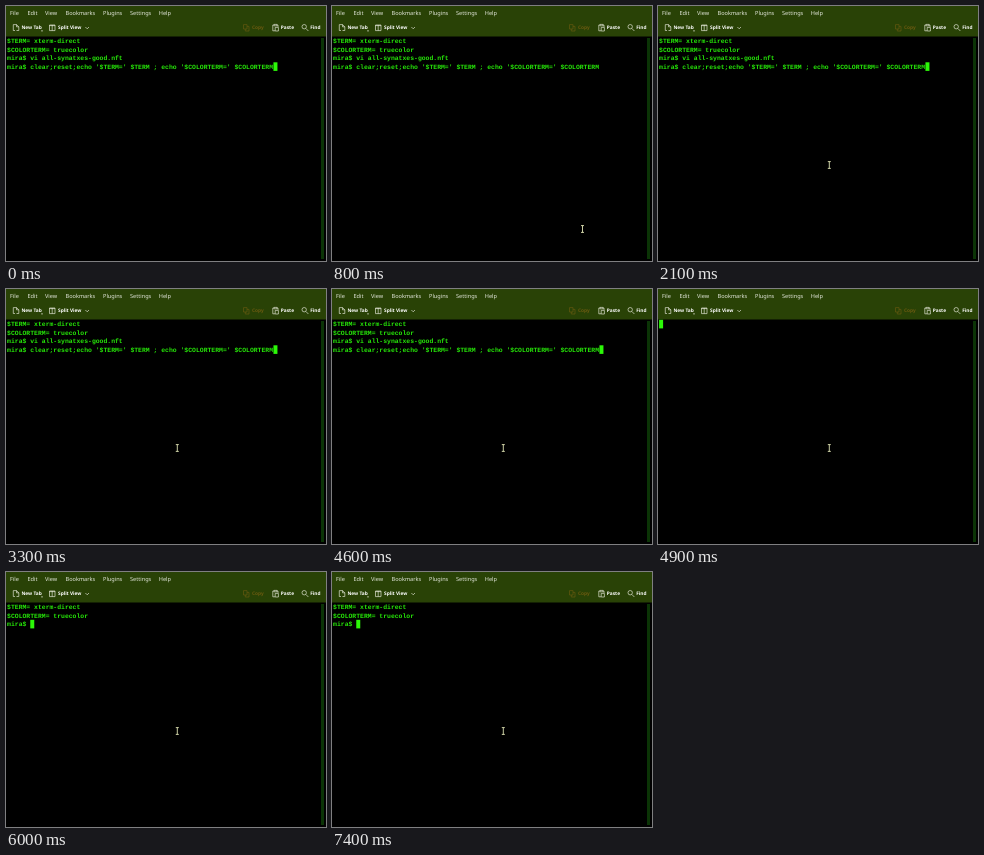
Write an HTML page that moves like this. It is 320 by 255 pixels and loops after 8000 ms.

```html
<!DOCTYPE html>
<html lang="en">
<head>
<meta charset="utf-8">
<title>Terminal</title>
<style>
  html, body { margin: 0; width: 100%; height: 100%; overflow: hidden; background: #000; }
  svg { display: block; width: 100%; height: 100%; }
  text { text-rendering: geometricPrecision; white-space: pre; }
  .menu { font: 5.6px "Noto Sans", "Open Sans", sans-serif; fill: #e4e8dc; }
  .tool { font: 600 4.8px "Noto Sans", "Open Sans", sans-serif; fill: #fff; }
  .term { font: bold 6.43px "Liberation Mono", monospace; fill: #26e808; }
  .icon { fill: none; stroke: #eceee0; stroke-width: .65; }
  .tool .dim { fill: #6a5a10; }
  .icon .dim { stroke: #6a5a10; }
</style>
</head>
<body>
<svg viewBox="0 0 320 255">
  <rect width="320" height="30.5" fill="#294206"/>
  <rect x="315" y="32" width="3" height="221" fill="#0b3406"/>
  <g id="menu" class="menu"></g>
  <g id="tools" class="tool"></g>
  <g class="icon">
    <path d="M9 24.5H7.3V18.6H10.5L12.8 20.8V24.5H10.5M10.5 18.6V20.8H12.8"/>
    <path d="M35 24.6H37L36 25.7Z" fill="#eceee0" stroke="none"/>
    <path d="M43.5 19H49V24.6H43.5ZM46.2 19V24.6M43.5 19.6H49"/>
    <path d="M79.4 21L81.2 22.8L83 21"/>
    <path class="dim" d="M237.5 18.6H241V23H237.5ZM239.3 23V25H243V20.4H241"/>
    <path d="M268 19H266.8V24.8H269M271 19H272V21M268 18.4H271V19.8H268ZM269.2 21.4H272.4V25H269.2Z"/>
    <path d="M299.9 22.5L302.4 25"/>
    <circle cx="298.2" cy="20.7" r="2.2"/>
  </g>
  <g id="lines" class="term"></g>
  <rect id="cursor" width="4" height="8.6" fill="#2cf808"/>
  <path id="pointer" d="M-1.5 -3.4H1.5M0 -3.4V3.4M-1.5 3.4H1.5" fill="none" stroke="#e0e4b4" stroke-width=".9"/>
</svg>
<script>
  const $ = id => document.getElementById(id);
  const LOOP = 8000, LEFT = 1.1, CHAR = 3.86, ROW = 8.5, TOP = 31;

  function addText(parent, x, y, string) {
    const t = document.createElementNS("http://www.w3.org/2000/svg", "text");
    t.setAttribute("x", x);
    t.setAttribute("y", y);
    t.textContent = string;
    $(parent).append(t);
    return t;
  }

  [[4, "File"], [21.4, "Edit"], [39, "View"], [59.5, "Bookmarks"],
   [97, "Plugins"], [124, "Settings"], [152.8, "Help"]]
    .forEach(([x, s]) => addText("menu", x, 8.6, s));

  [[15.4, "New Tab"], [52, "Split View"], [246, "Copy"], [274.8, "Paste"], [304.2, "Find"]]
    .forEach(([x, s]) => addText("tools", x, 23.4, s).classList.toggle("dim", s === "Copy"));

  const prompt = "mira$ ";
  const output = ["$TERM= xterm-direct", "$COLORTERM= truecolor"];
  const before = [...output, prompt + "vi all-synatxes-good.nft",
    prompt + "clear;reset;echo '$TERM=' $TERM ; echo '$COLORTERM=' $COLORTERM"];
  const after = [...output, prompt];
  const rows = before.map((_, i) => addText("lines", LEFT, TOP + 6.2 + i * ROW, ""));

  // The block cursor toggles at each of these times, starting visible.
  const blinks = [200, 900, 1400, 2100, 2700, 3300, 4000, 4600, 5500, 6000, 6700, 7400];
  // Pointer stops: start time, x, y
  const stops = [[800, 250.5, 223], [900, 196, 180], [1000, 171.3, 159]];

  function draw(now) {
    const t = now % LOOP;
    const screen = t < 4900 ? before : t < 6000 ? [""] : after;
    rows.forEach((row, i) => row.textContent = screen[i] || "");

    const last = screen.length - 1;
    $("cursor").setAttribute("x", LEFT + screen[last].length * CHAR);
    $("cursor").setAttribute("y", TOP + last * ROW - .2);
    const toggles = blinks.filter(b => b <= t).length;
    $("cursor").style.display = toggles % 2 ? "none" : "";

    const stop = stops.filter(s => s[0] <= t).pop();
    $("pointer").style.display = stop ? "" : "none";
    if (stop) $("pointer").setAttribute("transform", `translate(${stop[1]} ${stop[2]})`);
  }

  const start = performance.now();
  function tick() {
    draw(performance.now() - start);
    requestAnimationFrame(tick);
  }
  tick();
</script>
</body>
</html>
```
